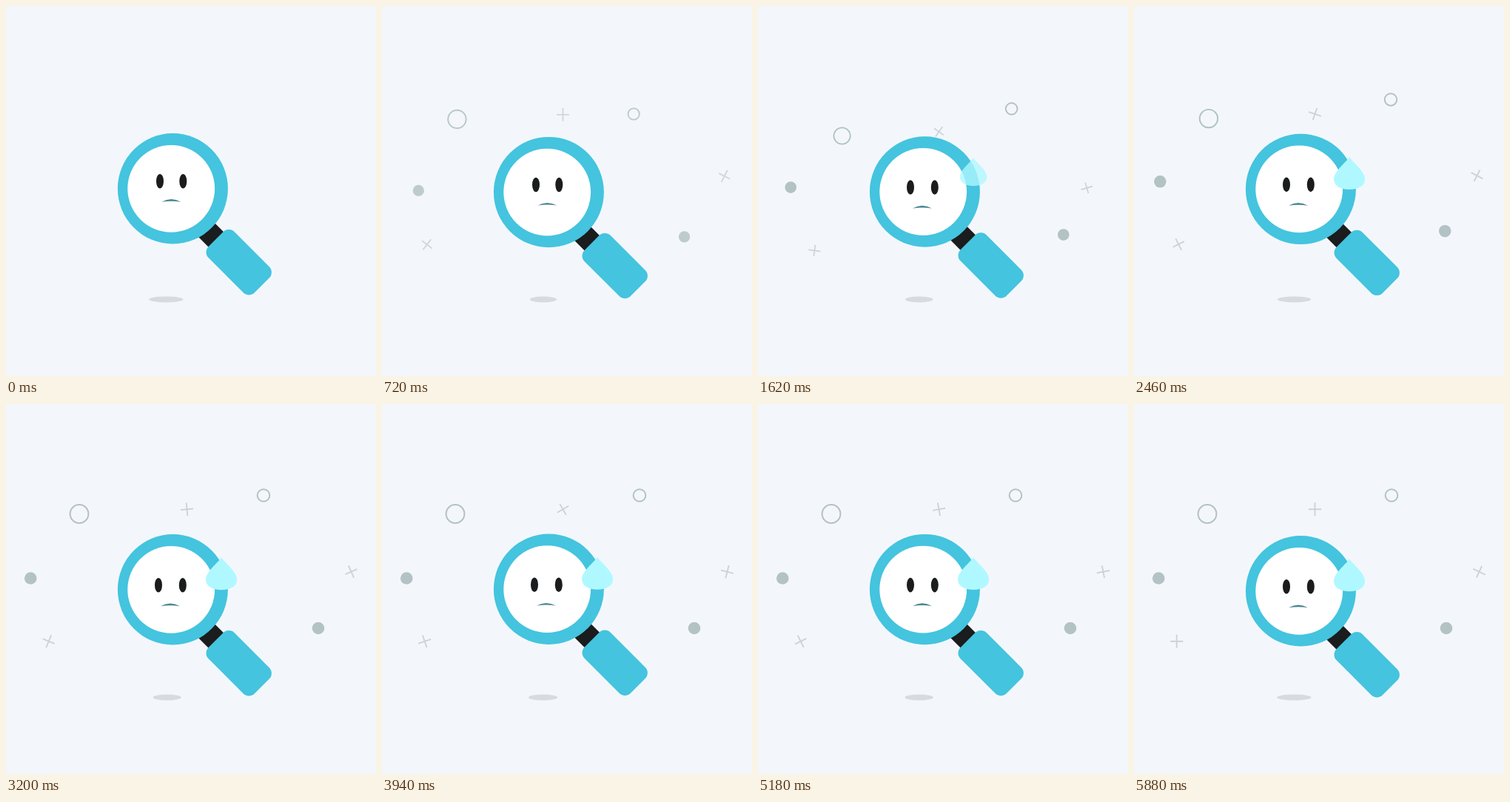
These frames come from a looping animation (500 px wide and 500 px high, 5920 ms). An HTML page with a canvas:

```html
<!DOCTYPE html>
<html lang="en">
<head>
<meta charset="utf-8">
<title>Searching</title>
<style>
  html, body { margin: 0; width: 100%; height: 100%; overflow: hidden; background: #f3f7fc; }
  canvas { display: block; width: 500px; height: 500px; }
</style>
</head>
<body>
<canvas id="stage" width="500" height="500"></canvas>
<script>
const ctx = document.getElementById('stage').getContext('2d');
const LOOP = 5920, STEP = 20, BEAT = 600;
const BLUE = '#44c4de', DARK = '#1a1c1d', GREY = '#b3c2c4', PALE = '#ccd3d7';
const ORIGIN = { x: 245, y: 419 };

const clamp = v => Math.max(0, Math.min(1, v));
const mix = (a, b, p) => a + (b - a) * p;
const span = (t, from, to) => clamp((t - from) / (to - from));

// Linear interpolation over [time, value] keys
function track(t, keys) {
  if (t <= keys[0][0]) return keys[0][1];
  for (let i = 1; i < keys.length; i++) {
    const [t0, v0] = keys[i - 1], [t1, v1] = keys[i];
    if (t < t1) return mix(v0, v1, (t - t0) / (t1 - t0));
  }
  return keys[keys.length - 1][1];
}

function layer(draw) {
  ctx.save();
  draw();
  ctx.restore();
}

function ellipse(x, y, rx, ry, fill) {
  ctx.beginPath();
  ctx.ellipse(x, y, rx, ry, 0, 0, Math.PI * 2);
  ctx.fillStyle = fill;
  ctx.fill();
}

function ring(x, y, r) {
  ctx.beginPath();
  ctx.arc(x, y, r, 0, Math.PI * 2);
  ctx.strokeStyle = GREY;
  ctx.lineWidth = 2;
  ctx.stroke();
}

function cross(x, y, deg) {
  layer(() => {
    ctx.translate(x, y);
    ctx.rotate(deg * Math.PI / 180);
    ctx.beginPath();
    ctx.moveTo(-8.6, 0);
    ctx.lineTo(8.6, 0);
    ctx.moveTo(0, -9);
    ctx.lineTo(0, 9);
    ctx.strokeStyle = PALE;
    ctx.lineWidth = 1.9;
    ctx.stroke();
  });
}

// Scales a group of particles out of the shared origin
function burst(scale, alpha, draw) {
  if (scale <= 0) return;
  layer(() => {
    ctx.globalAlpha = alpha;
    ctx.translate(ORIGIN.x, ORIGIN.y);
    ctx.scale(scale, scale);
    ctx.translate(-ORIGIN.x, -ORIGIN.y);
    draw();
  });
}

function particles(t) {
  const crosses = track(t, [[214, 0], [780, 1.1], [1590, 0.897], [2590, 1]]);
  burst(crosses, span(t, 214, 780), () => {
    ring(99, 148.5, 12.4);
    cross(244.5, 142.3, 360 * span(t, 1220, 5300));
    cross(466.5, 226.7, 0.052 * Math.max(0, t - 200));
    cross(57.7, 320.7, 360 * span(t, 150, 5580));
  });
  const dots = track(t, [[13, 0], [860, 1.107], [1440, 0.939], [2660, 1]]);
  burst(dots, span(t, 13, 860), () => {
    ring(348, 123.5, 8.3);
    ellipse(33.2, 235.5, 8.3, 8.3, GREY);
    ellipse(422, 303, 8.3, 8.3, GREY);
  });
}

function shadow(t) {
  const last = 9 * BEAT;
  const wave = t < last ? bounce(t) : 1 - span(t, last, 5880);
  const s = 1 - 0.27 * wave;
  ellipse(224 - 7.7 * s, 396.5, 23.2 * s, 4, '#d7dae0');
}

// Triangle wave between 0 and 1, resting at 1 after nine beats
function bounce(t) {
  const n = Math.min(t / BEAT, 9) % 2;
  return n < 1 ? n : 2 - n;
}

function glass() {
  layer(() => {
    ctx.translate(314.7, 346.3);
    ctx.rotate(Math.PI / 4);
    ctx.fillStyle = DARK;
    ctx.fillRect(-74, -14.4, 34, 28.8);
    ctx.beginPath();
    ctx.roundRect(-44, -24.8, 88, 49.6, 10.8);
    ctx.fillStyle = BLUE;
    ctx.fill();
  });
  ellipse(225.4, 246.8, 74.5, 74.7, BLUE);
  ellipse(223.2, 246.8, 58.9, 58.9, '#fff');
}

function face(t) {
  const p = span(t, 900, 1260);
  const dy = 4.1 * p;
  ellipse(208 - 2 * p, 236.7 + dy, 5, 9.8, DARK);
  ellipse(239.3 - 0.5 * p, 236.7 + dy, 5, 9.8, DARK);
  layer(() => {
    ctx.translate(223.4 - 1.4 * p, 264.8 + dy + 0.3 * p);
    ctx.beginPath();
    ctx.moveTo(-13, 0);
    ctx.quadraticCurveTo(0, -7.4, 13, 0);
    ctx.quadraticCurveTo(0, -2, -13, 0);
    ctx.fillStyle = '#4a8794';
    ctx.fill();
  });
}

function sweat(t) {
  const p = span(t, 1200, 1740);
  if (p === 0) return;
  layer(() => {
    const s = mix(0.41, 1, p);
    ctx.globalAlpha = p;
    ctx.translate(291.1, 225.3 - 24 * (1 - p));
    ctx.scale(s, s);
    ctx.beginPath();
    ctx.moveTo(0, -22);
    ctx.bezierCurveTo(4, -15, 21, -3, 21, 8);
    ctx.bezierCurveTo(21, 17, 12, 22, 0, 22);
    ctx.bezierCurveTo(-12, 22, -21, 17, -21, 8);
    ctx.bezierCurveTo(-21, -3, -4, -15, 0, -22);
    ctx.fillStyle = '#b0f8ff';
    ctx.fill();
  });
}

function render(t) {
  ctx.fillStyle = '#f3f7fc';
  ctx.fillRect(0, 0, 500, 500);
  shadow(t);
  particles(t);
  layer(() => {
    ctx.translate(0, 6 * bounce(t));
    glass();
    face(t);
    sweat(t);
  });
}

const start = performance.now();
function tick() {
  const t = (performance.now() - start) % LOOP;
  render(Math.min(5880, Math.floor(t / STEP) * STEP));
  requestAnimationFrame(tick);
}
tick();
</script>
</body>
</html>
```
